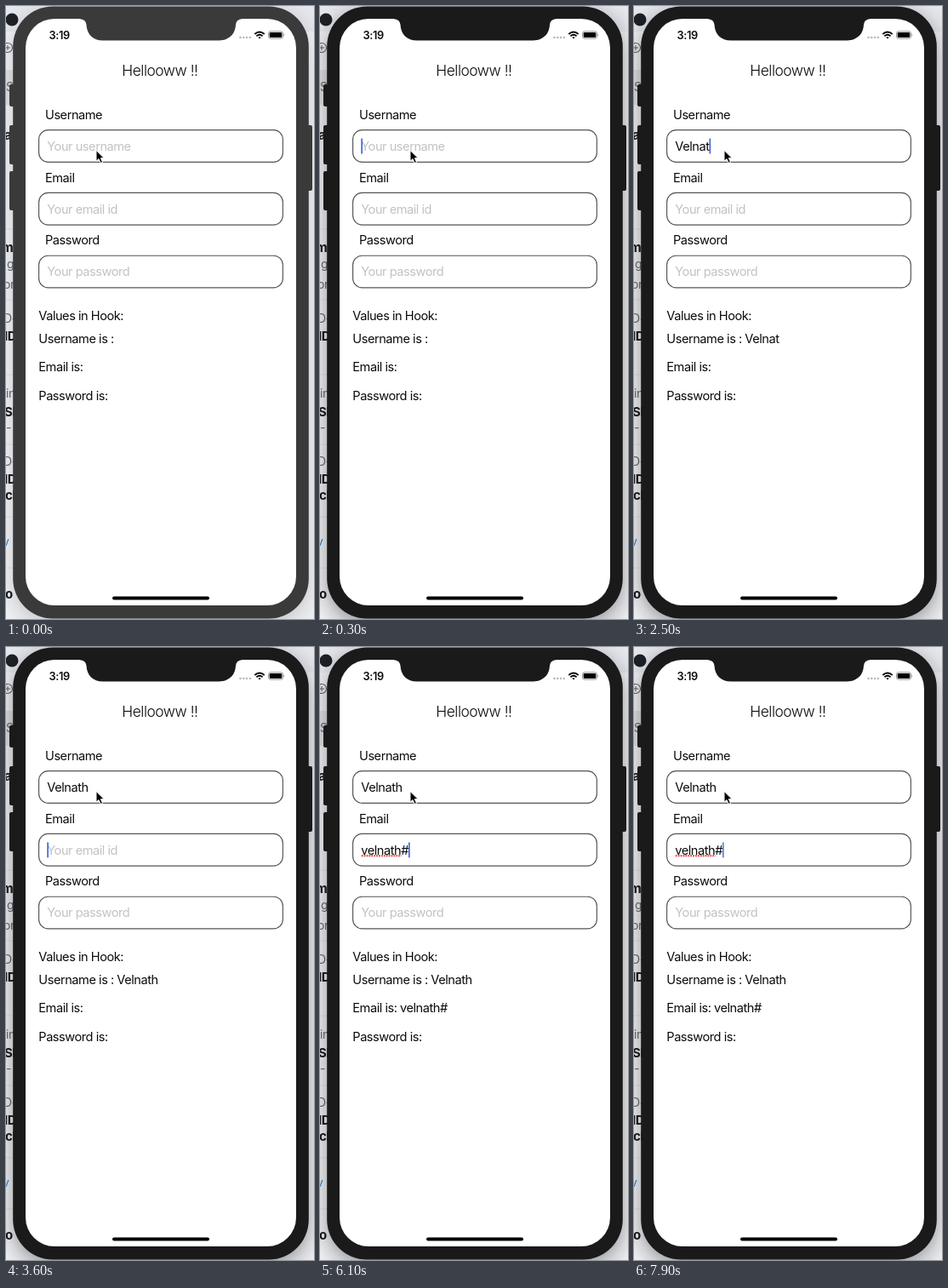
Animation of 362 by 720 pixels, one loop 8 s. Source, as an HTML page:

```html
<!DOCTYPE html>
<html lang="en">
<head>
<meta charset="utf-8">
<title>Form demo</title>
<style>
  html, body { margin: 0; width: 100%; height: 100%; overflow: hidden; background: #ececef; }
  svg { display: block; width: 100vw; height: 100vh; }
  text { font: 400 14.6px Inter, "Liberation Sans", sans-serif; letter-spacing: -.47px; fill: #0b0b0b; white-space: pre; }
  .title { font-size: 17.4px; font-weight: 300; }
  .time { font-size: 12.8px; font-weight: 600; letter-spacing: -.35px; }
  .hint { fill: #c2c2c4; }
  .page text { font-size: 14px; fill: #62666c; }
  .page .bold { font-size: 15px; font-weight: 700; fill: #15171a; }
  .page .link { fill: #2a7fd0; }
</style>
</head>
<body>
<svg id="stage" viewBox="0 0 362 720" xmlns="http://www.w3.org/2000/svg">
  <defs>
    <filter id="soft" x="-20%" y="-10%" width="140%" height="120%"><feGaussianBlur stdDeviation="12"/></filter>
  </defs>

  <g class="page">
    <rect width="362" height="720" fill="#f0f1f4"/>
    <rect width="362" height="30" fill="#e6e7ec"/>
    <rect y="75" width="30" height="41" fill="#e0e1e4"/>
    <path d="M0 262H9M0 345H9M0 433H9M0 515H9M0 600H9M0 660H9" stroke="#dfe0e4"/>
    <circle cx="7" cy="16" r="7.5" fill="#1d2126"/>
    <g fill="none" stroke="#5b5f65" stroke-width="1.1">
      <circle cx="2" cy="49" r="5.5"/><path d="M-1 49H5M2 46V52"/>
    </g>
    <g id="scraps"></g>
  </g>

  <rect id="shadow" x="8" y="8" width="348" height="719" rx="46" fill="#14171f" filter="url(#soft)"/>

  <g id="body">
    <path d="M6 92H12V118H6Q4 118 4 116V94Q4 92 6 92ZM6 140H12V186H6Q4 186 4 184V142Q4 140 6 140ZM6 194H12V240H6Q4 240 4 238V196Q4 194 6 194ZM352 140H358Q360 140 360 142V215Q360 217 358 217H352Z"/>
    <rect x="8.200" y=".4" width="347.600" height="719.200" rx="47"/>
  </g>
  <rect x="23" y="15" width="318" height="689" rx="34" fill="#fff"/>
  <path id="notch" d="M86 14.500V15Q94 15.500 94.500 22C95 33 102 40.500 114 40.500H250C262 40.500 269.500 33 270 22Q270.500 15.500 278 15V14.500Z"/>

  <text class="time" x="50.500" y="38.700">3:19</text>
  <g fill="#b9b9bb"><circle cx="275.500" cy="37" r="1.300"/><circle cx="279.300" cy="37" r="1.300"/><circle cx="283.100" cy="37" r="1.300"/><circle cx="286.900" cy="37" r="1.300"/></g>
  <g fill="none" stroke="#000" stroke-width="1.900">
    <path d="M292.300 33Q298 27.800 303.700 33M294.400 35.400Q298 32.200 301.600 35.400"/>
    <path d="M296.300 36.800Q298 35.500 299.700 36.800L298 38.600Z" fill="#000" stroke="none"/>
  </g>
  <rect x="308.500" y="29.800" width="17" height="8.400" rx="2.400" fill="#fff" stroke="#777" stroke-width=".8"/>
  <rect x="309.700" y="31" width="14.600" height="6" rx="1.300"/>
  <path d="M326.700 32.500Q328.300 34 326.700 35.500Z" fill="#777"/>

  <text class="title" x="136.300" y="82.200">Hellooww !!</text>
  <g id="form"></g>
  <text x="38.300" y="369">Values in Hook:</text>
  <g id="values"></g>

  <path id="squiggle" stroke="#e8332b" stroke-width="1.900" stroke-dasharray="1.800 1.100"/>
  <rect id="caret" width="1.700" height="18" fill="#4468dc"/>
  <rect x="125" y="693.500" width="114" height="4" rx="2"/>
  <path d="M106 169.500V182.300L109 179.600L111.200 184.400L113.500 183.400L111.300 178.700H115.300Z" stroke="#fff" stroke-width="1"/>
</svg>

<script>
const LOOP = 8000, STEP = 100;
const $ = id => document.getElementById(id);

function add(parent, tag, attrs, label = "") {
  const el = document.createElementNS("http://www.w3.org/2000/svg", tag);
  for (const key in attrs) el.setAttribute(key, attrs[key]);
  el.textContent = label;
  $(parent).append(el);
  return el;
}

// Words of the page peeking out behind the phone: text, x, baseline, style
[["S", 0, 100, ""], ["a", -2, 157, "bold"], ["m", -5, 289, "bold"], ["g", 1, 308, ""],
 ["or", -3, 332, ""], ["D-", -3, 372, ""], ["ID", -2, 393, "bold"], ["in", 0, 460, ""],
 ["SI", -2, 482, "bold"], ["- T", 0, 500, ""], ["D-", -3, 540, ""], ["ID", -2, 561, "bold"],
 ["cl", -1, 580, "bold"], ["v", -4, 634, "link"], ["o", -1, 696, "bold"]]
  .forEach(([word, x, y, style]) => add("scraps", "text", { x, y, class: style }, word));

const fields = [
  ["Username", "Your username", "Username is : ", 395.5],
  ["Email", "Your email id", "Email is: ", 429.3],
  ["Password", "Your password", "Password is:", 462.8]
].map(([label, hint, prefix, y], i) => {
  const top = 145.6 + i * 73.8;
  add("form", "text", { x: 46, y: top - 12.9 }, label);
  add("form", "rect", { x: 38.6, y: top, width: 286.8, height: 37.7, rx: 11, fill: "#fff", stroke: "#555", "stroke-width": 1.15 });
  return {
    top, hint, prefix,
    input: add("form", "text", { x: 48.3, y: top + 24.2 }),
    value: add("values", "text", { x: 38.3, y })
  };
});

// Lists of [start, value]; each value holds until the next start
const userKeys = [[0, ""], [1800, "V"], [1900, "Ve"], [2000, "Vel"], [2300, "Veln"],
  [2400, "Velna"], [2500, "Velnat"], [2700, "Velnath"]];
const mailKeys = [[0, ""], [4200, "v"], [4300, "ve"], [4400, "vel"], [4500, "veln"], [4600, "velna"],
  [4700, "vel"], [5000, "veln"], [5100, "velna"], [5200, "velnat"], [5300, "velnath"], [5400, "velnath#"]];

const fadeOut = t => [[t, .8], [t + 100, .45], [t + 200, 0]];
const fadeIn = t => [[t, .45], [t + 100, 1]];
const blink = [[0, 0], [300, 1], ...fadeOut(900), ...fadeIn(1400), [1800, 1], ...fadeOut(3200),
  [3600, 1], ...fadeOut(6700), ...fadeIn(7200), [7800, .95], [7900, .85]];

const at = (keys, t) => keys.findLast(key => key[0] <= t)[1];

function draw(time) {
  const t = Math.floor(time % LOOP / STEP) * STEP;
  const focused = t >= 300;
  const typed = [at(userKeys, t), at(mailKeys, t), ""];

  fields.forEach((f, i) => {
    f.input.textContent = typed[i] || f.hint;
    f.input.setAttribute("class", typed[i] ? "" : "hint");
    f.value.textContent = f.prefix + typed[i];
  });

  const shell = focused ? "#1a1a1b" : "#3a3a3b";
  $("body").setAttribute("fill", shell);
  $("notch").setAttribute("fill", shell);
  $("shadow").setAttribute("opacity", focused ? .42 : .2);

  const active = t < 3600 ? 0 : 1;
  const { input, top } = fields[active];
  const width = typed[active] ? input.getComputedTextLength() : 0;
  $("caret").setAttribute("x", 48.3 + width);
  $("caret").setAttribute("y", top + 10);
  $("caret").setAttribute("opacity", at(blink, t));

  if (t >= 5900) {
    const end = 48.8 + input.getSubStringLength(0, typed[1].length - 1);
    $("squiggle").setAttribute("d", `M48.8 245.2H${end}`);
  }
  $("squiggle").setAttribute("opacity", t >= 5900 ? 1 : 0);
}

function tick() {
  draw(performance.now());
  requestAnimationFrame(tick);
}
tick();
</script>
</body>
</html>
```
